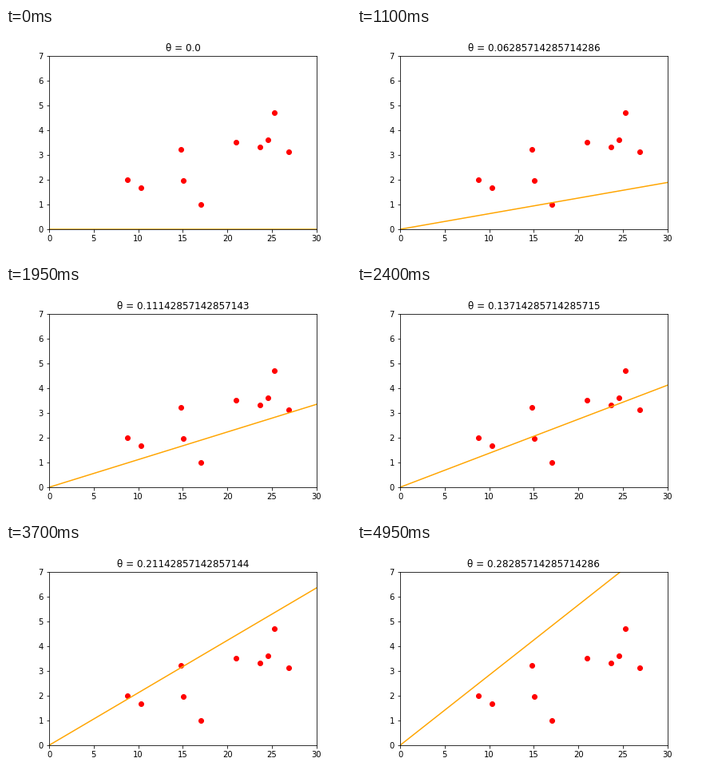
A matplotlib script for the animation above (5000 ms loop, 432 px wide and 288 px high).

```python
import matplotlib.pyplot as plt
from matplotlib.animation import FuncAnimation

FRAMES = 100
INTERVAL = 50
X_MAX, Y_MAX = 30, 7
SLOPE_STEP = 1 / 350

# The ten samples to be fitted
xs = [8.8, 10.3, 14.8, 15.05, 17, 21, 23.7, 24.55, 25.3, 26.9]
ys = [2, 1.67, 3.22, 1.96, 1, 3.5, 3.31, 3.6, 4.7, 3.12]

fig, ax = plt.subplots(figsize=(6, 4), dpi=72)
fig.subplots_adjust(left=0.125, right=0.9, bottom=0.125, top=0.88)
ax.set(xlim=(0, X_MAX), ylim=(0, Y_MAX))
ax.plot(xs, ys, "ro")
line, = ax.plot([0, X_MAX], [0, 0], color="orange")
title = ax.set_title("")


def update(i):
    """Show the line through the origin with slope theta."""
    theta = i * SLOPE_STEP
    line.set_ydata([0, theta * X_MAX])
    title.set_text(f"θ = {theta}")
    return line, title


anim = FuncAnimation(fig, update, frames=FRAMES, interval=INTERVAL,
                     init_func=lambda: update(0), repeat=True, repeat_delay=0)
plt.show()
```
